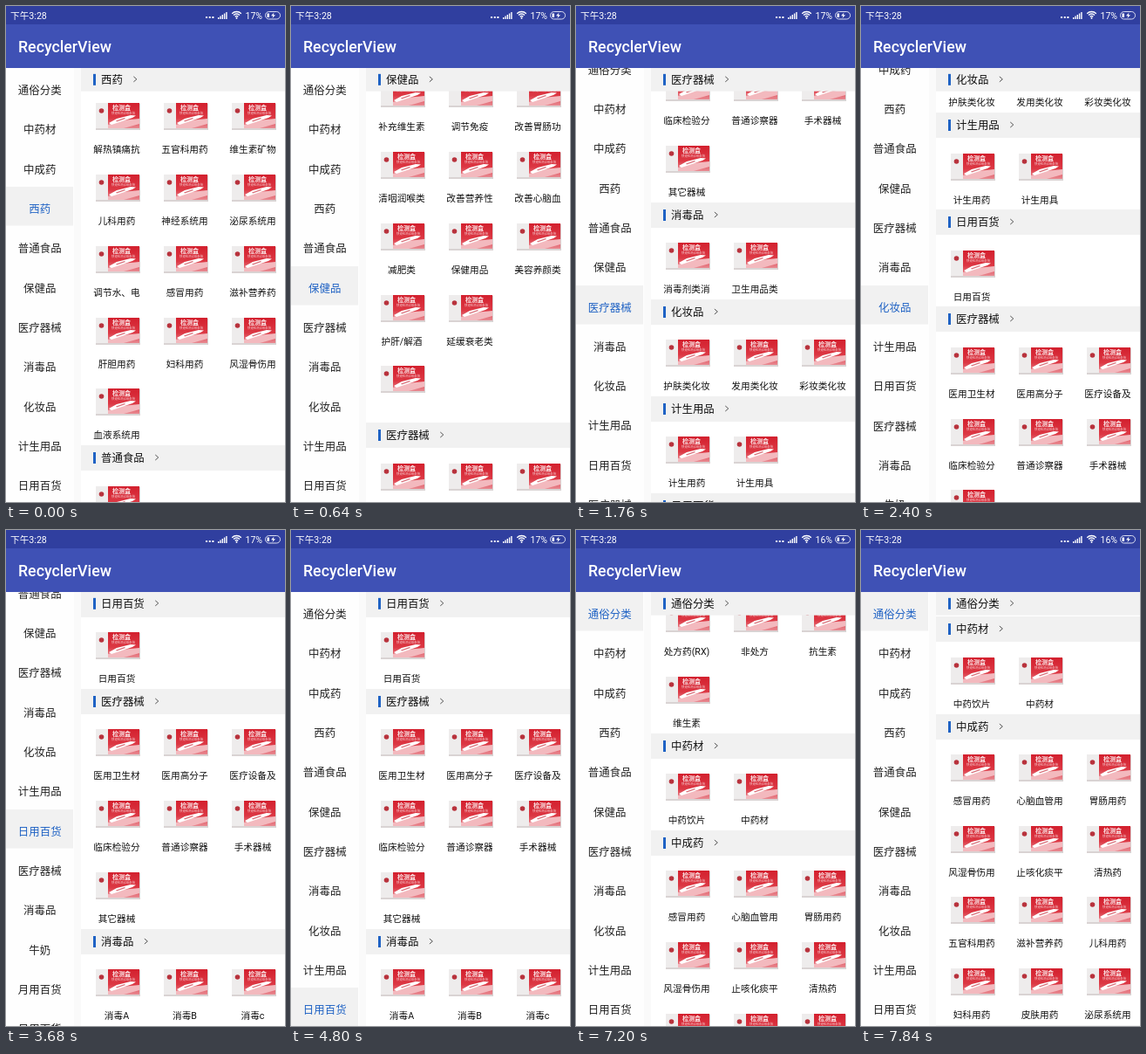
Animation of 320 by 568 pixels, one loop 8 s. Source, as an HTML page with a canvas:

```html
<!DOCTYPE html>
<html lang="zh">
<head>
<meta charset="utf-8">
<style>
html, body { margin: 0; width: 100%; height: 100%; overflow: hidden; background: #fff; }
canvas { display: block; width: 320px; height: 568px; }
</style>
</head>
<body>
<canvas id="stage"></canvas>
<script>
const canvas = document.getElementById('stage');
const g = canvas.getContext('2d');
const dpr = window.devicePixelRatio || 1;
canvas.width = 320 * dpr;
canvas.height = 568 * dpr;

const LOOP = 8000, STEP = 160;
const DP = 320 / 360;
const TOP = 71, HEAD = 33 * DP, STICKY = 30 * DP, ROW = 92 * DP, MENU = 51 * DP;
const GREY = '#f1f1f1', BLUE = '#1f62c4', WHITE = '#fff';
const FONT = 'Roboto, "Noto Sans CJK SC", "Noto Sans CJK", sans-serif';

const devices = '医用卫生材 医用高分子 医疗设备及 临床检验分 普通诊察器 手术器械 其它器械';
// "-" is an empty cell, "_" an item without a label
const sections = [
  ['通俗分类', '处方药(RX) 非处方 抗生素 维生素'],
  ['中药材', '中药饮片 中药材'],
  ['中成药', '感冒用药 心脑血管用 胃肠用药 风湿骨伤用 止咳化痰平 清热药 五官科用药 滋补营养药 儿科用药 妇科用药 皮肤用药 泌尿系统用'],
  ['西药', '解热镇痛抗 五官科用药 维生素矿物 儿科用药 神经系统用 泌尿系统用 调节水、电 感冒用药 滋补营养药 肝胆用药 妇科用药 风湿骨伤用 血液系统用'],
  ['普通食品', '普通食品'],
  ['保健品', '补充维生素 调节免疫 改善胃肠功 清咽润喉类 改善营养性 改善心脑血 减肥类 保健用品 美容养颜类 护肝/解酒 延缓衰老类 - _'],
  ['医疗器械', devices],
  ['消毒品', '消毒剂类消 卫生用品类'],
  ['化妆品', '护肤类化妆 发用类化妆 彩妆类化妆'],
  ['计生用品', '计生用药 计生用具'],
  ['日用百货', '日用百货'],
  ['医疗器械', devices],
  ['消毒品', '消毒A 消毒B 消毒c']
].map(([title, list]) => ({ title, items: list.split(' ') }));
const menu = [...sections.map(s => s.title), '牛奶', '月用百货', '日用百货'];

let end = 0;
for (const s of sections) {
  s.top = end;
  end += HEAD + Math.ceil(s.items.length / 3) * ROW;
}

// time, section, offset within the section
const scrollKeys = [
  [0, 3, 6], [640, 5, 32], [1760, 6, 121], [2720, 10, 0], [5439, 10, 0],
  [5440, 0, 0], [6720, 0, 0], [7200, 0, 31], [7840, 0, 164.5]
].map(([t, i, offset]) => [t, sections[i].top + offset]);

function scrollAt(t) {
  const k = scrollKeys.findIndex(key => key[0] > t);
  if (k < 0) return scrollKeys[scrollKeys.length - 1][1];
  const [t0, a] = scrollKeys[k - 1], [t1, b] = scrollKeys[k];
  return a + (b - a) * (t - t0) / (t1 - t0);
}

function menuScrollAt(t, active) {
  const follow = Math.max(0, active * MENU - 248.5);
  if (t < 3840 || t >= 5440) return follow;
  return follow * (1 - Math.min(1, (t - 3840) / 960)) ** 2;
}

function rect(x, y, w, h, color) {
  g.fillStyle = color;
  g.fillRect(x, y, w, h);
}

function poly(color, ...p) {
  g.fillStyle = color;
  g.beginPath();
  for (let i = 0; i < p.length; i += 2) g.lineTo(p[i], p[i + 1]);
  g.closePath();
  g.fill();
}

function stroke(color, width, path) {
  g.strokeStyle = color;
  g.lineWidth = width;
  g.beginPath();
  path();
  g.stroke();
}

// y is the visual middle of the glyphs
function text(str, x, y, size, color, align = 'left', weight = 400) {
  g.font = `${weight} ${size}px ${FONT}`;
  g.textAlign = align;
  g.fillStyle = color;
  g.fillText(str, x, y + size * 0.38);
}

function clip(x, y, w, h, draw) {
  g.save();
  g.beginPath();
  g.rect(x, y, w, h);
  g.clip();
  draw();
  g.restore();
}

function product(x, y) {
  g.save();
  g.translate(x, y);
  rect(0, 1, 51, 30, '#d9d3d3');
  rect(0, 0, 14, 29, '#eeecec');
  const red = g.createLinearGradient(0, 0, 0, 29);
  red.addColorStop(0, '#d3202e');
  red.addColorStop(0.6, '#dc3844');
  red.addColorStop(1, '#e88a92');
  rect(14, 0, 36, 29, red);
  g.fillStyle = '#b8323c';
  g.beginPath();
  g.arc(6.5, 9, 2.8, 0, 7);
  g.fill();
  text('检测盒', 19, 5.5, 7, '#fbe9ea', 'left', 700);
  text('快速检测试纸条装', 18, 12, 3.4, '#f6cfd2');
  poly('#f3b9be', 14, 25, 30, 20, 50, 18, 50, 24, 32, 29, 14, 29);
  poly('#fff', 15, 23, 24, 18, 40, 14, 46, 14.5, 42, 17, 30, 21, 18, 25);
  poly('#d8707a', 23, 20.5, 33, 17, 34, 18, 24, 21.5);
  g.restore();
}

function header(title, y, height) {
  const mid = y + height / 2, x = 109 + title.length * 14 * DP + 12.5;
  rect(86, y, 234, height, GREY);
  rect(100, mid - 6.5, 3, 13, BLUE);
  text(title, 109, mid, 14 * DP, '#111');
  stroke('#555', 1, () => {
    g.moveTo(x, mid - 3.5);
    g.lineTo(x + 3.5, mid - 0.5);
    g.lineTo(x, mid + 2.5);
  });
}

function drawList(scroll, active) {
  rect(86, TOP, 234, 497, WHITE);
  for (const s of sections) {
    const y = TOP + s.top - scroll;
    if (y > 568) break;
    header(s.title, Math.round(y), 29);
    s.items.forEach((name, i) => {
      const rowY = Math.round(y + HEAD + Math.floor(i / 3) * ROW);
      if (name === '-' || rowY < TOP - ROW || rowY > 568) return;
      const x = 127 + i % 3 * 78;
      product(x - 24, rowY + 17);
      if (name !== '_') text(name, x, rowY + 70, 12 * DP, '#111', 'center');
    });
  }
  const next = sections[active + 1];
  const push = next ? Math.min(0, next.top - scroll - STICKY) : 0;
  header(sections[active].title, TOP + push, STICKY);
}

function drawMenu(scroll, active) {
  rect(0, TOP, 78, 497, '#fefefe');
  menu.forEach((name, i) => {
    const y = Math.round(TOP + i * MENU - scroll), on = i === active;
    if (on) rect(0, y, 77, 44.5, GREY);
    text(name, 38.7, y + 25, 14 * DP, on ? BLUE : '#222', 'center');
  });
}

function drawBars(t) {
  rect(0, 0, 320, 21, '#303f9f');
  rect(0, 21, 320, 50, '#3f51b5');
  text('下午3:28', 5, 11, 12 * DP, WHITE);
  text('RecyclerView', 14, 46.5, 20 * DP, WHITE, 'left', 500);
  for (let i = 0; i < 3; i++) rect(229 + i * 3.7, 12, 2, 2, WHITE);
  for (let i = 0; i < 5; i++) rect(243 + i * 2.3, 13 - i * 1.5, 1.4, 2 + i * 1.5, WHITE);
  for (const r of [2.5, 5, 7.5])
    stroke(WHITE, 1.3, () => g.arc(264.5, 14, r, Math.PI * 1.25, Math.PI * 1.75));
  rect(263.7, 13, 1.6, 1.8, WHITE);
  text(t < 6400 ? '17%' : '16%', 274.5, 11, 10.5, WHITE);
  stroke('#d9dcf0', 1, () => g.roundRect(297.5, 6.5, 17, 8.5, 4.2));
  rect(299.5, 8.5, 2.5, 4.5, WHITE);
  poly(WHITE, 307.5, 7.5, 304, 11.3, 306.3, 11.3, 305.5, 14, 309, 10.2, 306.7, 10.2);
}

function frame() {
  const t = Math.floor(performance.now() % LOOP / STEP) * STEP;
  const scroll = scrollAt(t);
  const active = sections.filter(s => s.top <= scroll + 0.5).length - 1;
  g.setTransform(dpr, 0, 0, dpr, 0, 0);
  rect(0, 0, 320, 568, '#fafafa');
  clip(86, TOP, 234, 497, () => drawList(scroll, active));
  clip(0, TOP, 78, 497, () => drawMenu(menuScrollAt(t, active), active));
  drawBars(t);
  requestAnimationFrame(frame);
}
requestAnimationFrame(frame);
</script>
</body>
</html>
```
